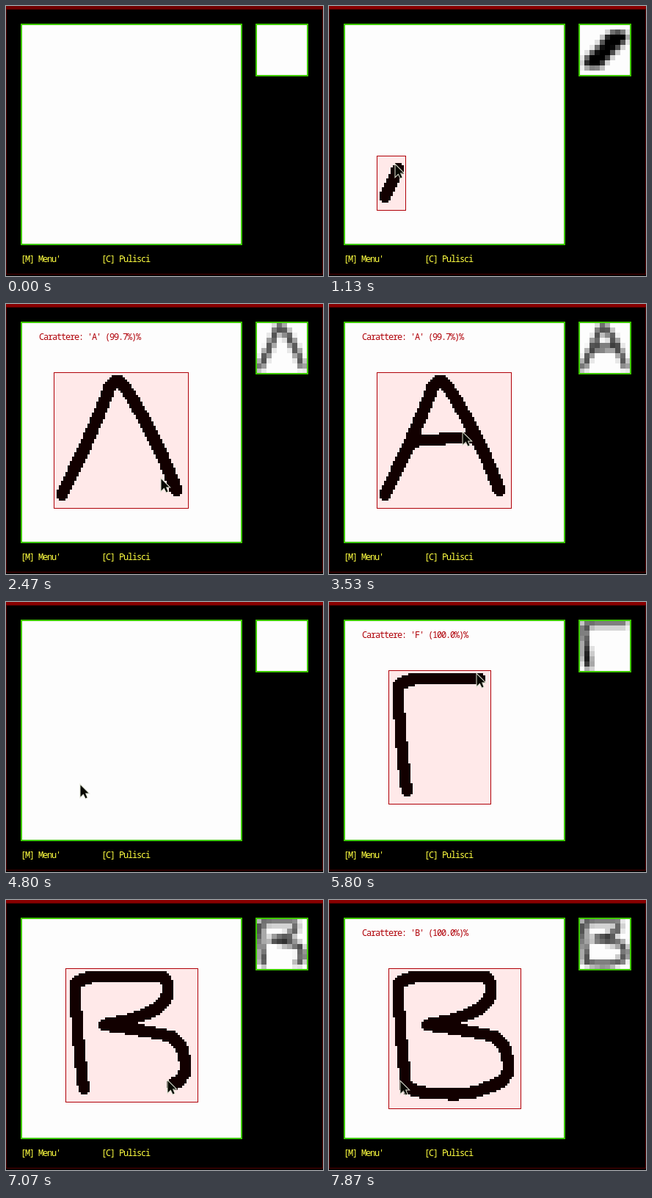
An HTML page with a canvas for the animation above (8000 ms loop, 432x368 px).

```html
<!DOCTYPE html>
<html lang="it">
<head>
<meta charset="utf-8">
<style>
html, body { margin: 0; overflow: hidden; background: #000; }
canvas { display: block; }
</style>
</head>
<body>
<canvas id="stage" width="432" height="368"></canvas>
<script>
const ctx = document.getElementById('stage').getContext('2d');
const LOOP = 8000, FPS = 15, CLEAR_TICK = 64;
const BOARD = { x: 21, y: 25, size: 300 };
const THUMB = { x: 341, y: 25, size: 70, cells: 10 };
const CELL = 3, GRID = 100, BRUSH = 5;
const GREEN = '#3cc800', YELLOW = '#ffff40', RED = '#b00008';

// Times are ticks of 1/15 s.
const moves = [
  glide(2, 9, 'M437 22 L76 260'),
  stroke(14, 27, 'M76 260 Q112 190 140 117 Q149 97 160 110'),
  stroke(27, 36, 'M160 110 Q205 180 232 254'),
  glide(36, 43, 'M232 254 L117 187'),
  stroke(43, 52, 'M117 187 L192 181'),
  glide(53, 60, 'M187 181 L437 22'),
  glide(64, 71, 'M437 22 L106 255'),
  stroke(74, 87, 'M106 257 Q96 180 94 114 Q104 106 125 104 H206'),
  stroke(87, 106, 'M206 104 Q222 103 220 126 Q218 156 134 170 Q205 181 225 186 Q243 198 244 225 Q246 244 225 252'),
  stroke(106, 118, 'M225 252 Q195 266 165 265 Q120 265 102 253')
];

const guesses = [
  { from: 34, to: 64, text: "'A' (99.7%)%" },
  { from: 83, to: 91, text: "'F' (100.0%)%" },
  { from: 112, to: 120, text: "'B' (100.0%)%" }
];

function glide(from, to, d) {
  const path = document.createElementNS('http://www.w3.org/2000/svg', 'path');
  path.setAttribute('d', d);
  return { from, to, path, length: path.getTotalLength() };
}

function stroke(from, to, d) {
  const move = glide(from, to, d);
  move.points = Array.from({ length: Math.ceil(move.length) + 1 }, (_, i) => move.path.getPointAtLength(i));
  return move;
}

function reach(move, tick) {
  return move.length * Math.min(1, (tick - move.from) / (move.to - move.from));
}

function inkAt(tick) {
  const ink = new Uint8Array(GRID * GRID);
  let left = GRID, top = GRID, right = 0, bottom = 0;
  for (const move of moves) {
    const wiped = move.from < CLEAR_TICK && tick >= CLEAR_TICK;
    if (!move.points || wiped || tick < move.from) continue;
    for (const p of move.points.slice(0, Math.ceil(reach(move, tick)) + 1)) {
      const col = Math.round((p.x - BOARD.x) / CELL - BRUSH / 2);
      const row = Math.round((p.y - BOARD.y) / CELL - BRUSH / 2);
      for (let r = 0; r < BRUSH; r++) {
        const inset = r % (BRUSH - 1) ? 0 : 1, start = (row + r) * GRID + col;
        ink.fill(1, start + inset, start + BRUSH - inset);
      }
      left = Math.min(left, col);
      top = Math.min(top, row);
      right = Math.max(right, col + BRUSH);
      bottom = Math.max(bottom, row + BRUSH);
    }
  }
  if (!right) return null;
  // The selection's margin grows with its distance from the board's corner.
  const x = Math.round(left * CELL * 0.91), y = Math.round(top * CELL * 0.945);
  const w = Math.round(right * CELL * 1.043) - x, h = Math.round(bottom * CELL * 1.045) - y;
  return { ink, x, y, w, h };
}

function rect(color, x, y, w, h) {
  ctx.fillStyle = color;
  ctx.fillRect(x, y, w, h);
}

function outline(color, width, x, y, w, h) {
  ctx.strokeStyle = color;
  ctx.lineWidth = width;
  ctx.strokeRect(x, y, w, h);
}

function label(text, x, y, color) {
  ctx.font = '12px "Noto Sans Mono", "DejaVu Sans Mono", monospace';
  ctx.letterSpacing = '-1.2px';
  ctx.fillStyle = color;
  ctx.fillText(text, x, y);
}

function drawInk({ ink, x, y, w, h }) {
  rect('#ffe9e9', BOARD.x + x, BOARD.y + y, w, h);
  outline(RED, 1, BOARD.x + x + 0.5, BOARD.y + y + 0.5, w - 1, h - 1);
  ink.forEach((on, i) => {
    if (on) rect('#120000', BOARD.x + i % GRID * CELL, BOARD.y + Math.floor(i / GRID) * CELL, CELL, CELL);
  });
}

// The thumbnail stretches the selection; overlapping samples soften it.
function drawThumb({ ink, x, y, w, h }) {
  const n = THUMB.cells, size = THUMB.size / n, samples = 6;
  const spread = k => (k + 0.5) / samples * 1.5 - 0.25;
  for (let row = 0; row < n; row++) for (let col = 0; col < n; col++) {
    let hits = 0;
    for (let s = 0; s < samples * samples; s++) {
      const u = x + w * (col + spread(s % samples)) / n;
      const v = y + h * (row + spread(Math.floor(s / samples))) / n;
      hits += ink[Math.floor(v / CELL) * GRID + Math.floor(u / CELL)] || 0;
    }
    const light = 253 * (1 - hits / (samples * samples));
    rect(`rgb(${light}, ${light}, ${light})`, THUMB.x + col * size, THUMB.y + row * size, size, size);
  }
}

function drawPointer(tick) {
  const move = moves.filter(m => m.from <= tick).pop();
  if (!move) return;
  const p = move.path.getPointAtLength(reach(move, tick));
  const arrow = new Path2D('M.5 .5V16.5L4.5 12.5L7.5 18.5L9.5 17.5L7 11.5H11.5Z');
  ctx.save();
  ctx.translate(Math.round(p.x - 5), Math.round(p.y - 6));
  ctx.strokeStyle = '#dfe4d4';
  ctx.lineWidth = 2;
  ctx.stroke(arrow);
  ctx.fillStyle = '#080800';
  ctx.fill(arrow);
  ctx.restore();
}

function draw(tick) {
  rect('#000', 0, 0, 432, 368);
  outline('#500000', 1, 0.5, 4.5, 431, 361);
  rect(tick < 2 ? '#700000' : '#880000', 0, 0, 432, 4);
  label("[M] Menu'", 20, 349, YELLOW);
  label('[C] Pulisci', 130, 349, YELLOW);
  for (const { x, y, size } of [BOARD, THUMB]) rect('#fdfdfd', x, y, size, size);

  const drawing = inkAt(tick);
  if (drawing) {
    drawInk(drawing);
    drawThumb(drawing);
  }
  for (const { x, y, size } of [BOARD, THUMB]) outline(GREEN, 2, x, y, size, size);

  const guess = guesses.find(g => tick >= g.from && tick < g.to);
  if (guess) label('Carattere: ' + guess.text, 45, 49, RED);
  drawPointer(tick);
}

let shown = -1;
function frame() {
  const tick = Math.floor((performance.now() % LOOP + 4) * FPS / 1000);
  if (tick !== shown) draw(shown = tick);
  requestAnimationFrame(frame);
}
frame();
</script>
</body>
</html>
```
